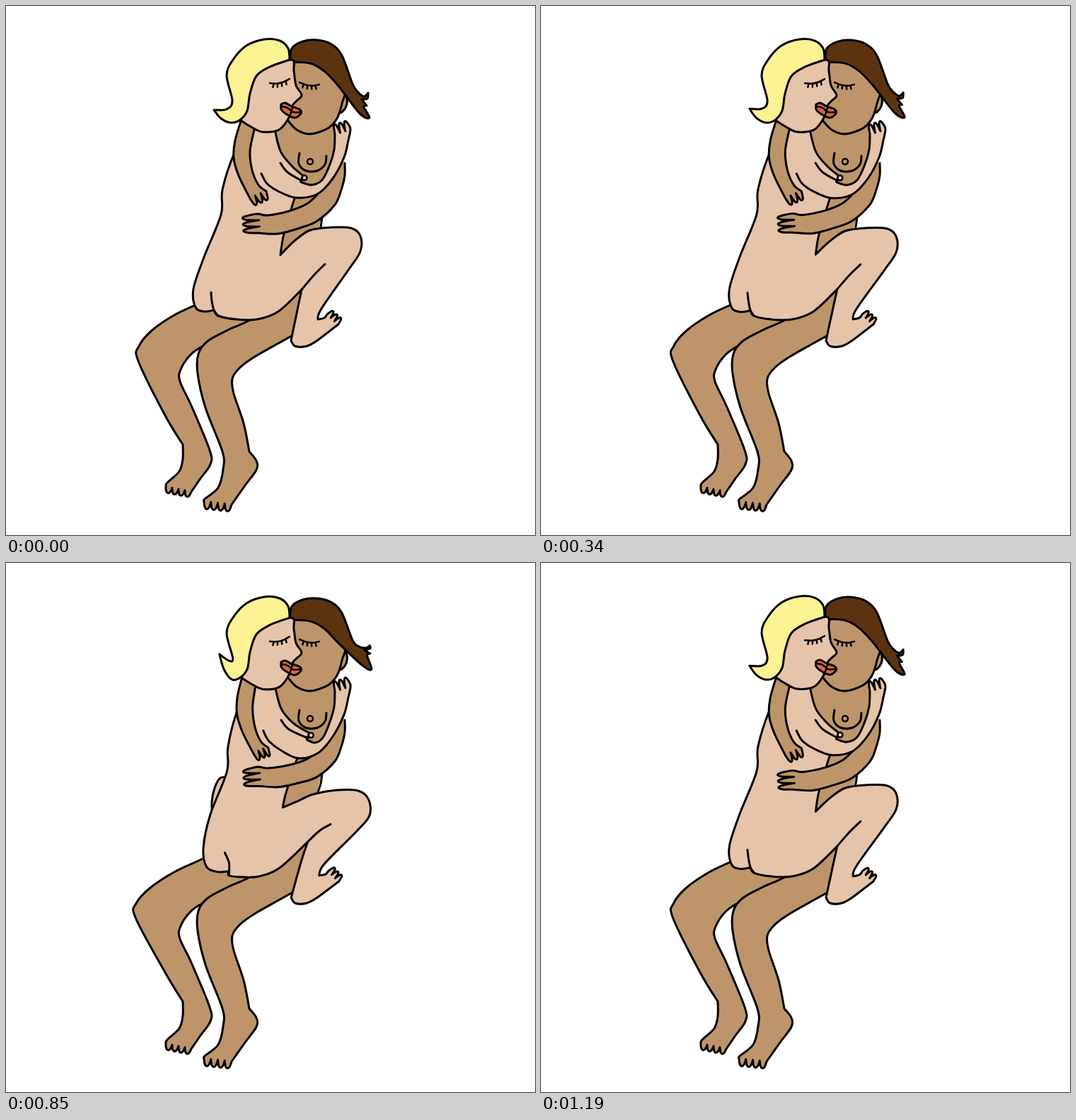
An HTML page that plays this animation: 748x748 px, repeating every 1360 ms.

```html
<!DOCTYPE html>
<html lang="en">
<head>
<meta charset="utf-8">
<title>Embrace</title>
<style>
  html, body { margin: 0; width: 100%; height: 100%; overflow: hidden; background: #fff; }
  svg { display: block; width: 100%; height: 100%; }
</style>
</head>
<body>
<svg id="stage" viewBox="0 0 748 748" fill="none" stroke="#000" stroke-width="3"
     stroke-linecap="round" stroke-linejoin="round"></svg>
<script>
const PALE = '#e6c4aa', TAN = '#be956a', BLOND = '#fbf293', DARK = '#5c3311', LIP = '#d9683f';
const STEP = 170;
const SWAY = [0, .05, .1, -.5, -1, 1, .6, .1]; // -1 leans left, 1 leans right

// Handles drag the points around them: place, reach, offset at left lean and right lean.
const handle = (x, y, reach, left, right) => ({ x, y, reach, left, right });
const HANDLES = [
  handle(268, 400, 70, [-9, 7], [13, 2]),    // hip
  handle(292, 422, 22, [0, 0], [14, 5]),     // cleft
  handle(306, 280, 45, [-10, 0], [8, 0]),    // back
  handle(330, 215, 45, [-10, 0], [4, 0]),    // shoulder
  handle(358, 275, 18, [-8, 0], [1, -4]),    // hand on the back
  handle(498, 345, 60, [-6, -4], [13, 10]),  // knee
  handle(425, 320, 40, [2, 2], [0, 7]),      // thigh
  handle(388, 352, 22, [-14, 7], [2, -8]),   // groin
  handle(402, 292, 30, [-6, 0], [4, 6]),     // belly
  handle(420, 244, 18, [-10, -4], [9, 0]),   // breast
  handle(425, 400, 35, [5, -4], [8, -8]),    // back of the knee
  handle(355, 105, 60, [-5, 1], [0, 2]),     // face
  handle(298, 147, 15, [-8, -4], [8, -20]),  // blond curl
  handle(512, 142, 22, [4, -4], [5, -13]),   // dark tips
  handle(440, 50, 40, [0, 2], [0, 2])        // crown
];
const ARM_LIFT = [handle(365, 305, 70, [2, 0], [1, -6])];
const SHIN_SLIP = [handle(187, 490, 40, [1, 0], [-4, 0])];

const stage = document.getElementById('stage');
const pairs = s => {
  const n = s.trim().split(' ').map(Number);
  return n.flatMap((v, i) => i % 2 ? [] : [[v, n[i + 1]]]);
};

// Outlines are x y pairs joined smoothly; a slash makes a corner.
const shape = s => s.split('/').map(pairs);

function lean(segs, sway, handles) {
  const side = sway < 0 ? 'left' : 'right', amount = Math.abs(sway);
  return segs.map(seg => seg.map(([x, y]) => {
    let dx = 0, dy = 0;
    for (const h of handles) {
      const w = amount * Math.exp(-((x - h.x) ** 2 + (y - h.y) ** 2) / h.reach ** 2);
      dx += w * h[side][0];
      dy += w * h[side][1];
    }
    return [x + dx, y + dy];
  }));
}

// A row of rounded fingers or toes from one point to another.
function digits(x0, y0, x1, y1, count, size) {
  const dx = x1 - x0, dy = y1 - y0, len = Math.hypot(dx, dy);
  const at = (k, h) => `${x0 + dx * k - dy / len * h * size} ${y0 + dy * k + dx / len * h * size}`;
  let out = at(0, 0);
  for (let i = 0; i < count; i++) {
    const p = (k, h) => at((i + k) / count, h);
    out += ` ${p(.2, .75)} ${p(.5, 1)} ${p(.8, .75)} ${p(1, 0)}`;
    if (i < count - 1) out += ' / ' + p(1, .01);
  }
  return out;
}

function curve(segs) {
  let last = null, d = '';
  for (const seg of segs) {
    const p = last ? [last, ...seg] : seg;
    if (!last) d = 'M' + p[0];
    for (let i = 0; i < p.length - 1; i++) {
      const a = p[i - 1] || p[i], b = p[i], c = p[i + 1], e = p[i + 2] || c;
      const h = [b[0] + (c[0] - a[0]) / 6, b[1] + (c[1] - a[1]) / 6,
                 c[0] - (e[0] - b[0]) / 6, c[1] - (e[1] - b[1]) / 6, ...c];
      d += 'C' + h.map(v => v.toFixed(1)).join(' ');
    }
    last = p[p.length - 1];
  }
  return d;
}

const body = shape('345 165 322 210 306 260 304 295 280 355 265 400 268 426 280 432 294 430 / ' +
  '300 438 325 443 355 443 385 432 418 401 / 413 425 403 473 / 409 481 425 481 440 473 470 450 / ' +
  digits(470, 450, 454, 436, 3, 9) + ' / 450 441 441 443 / 446 428 485 372 501 347 501 325 488 314 ' +
  '460 313 430 317 408 332 388 352 / 393 322 408 272 416 250 420 240 / 404 226 388 205 379 170');
const fold = shape('418 401 435 381 451 365');
const cleft = shape('290 405 291 417 294 430 300 438');
const paleArm = shape('361 237 369 251 385 262 410 271 440 266 462 244 478 214 484 190 ' +
  digits(487, 174, 465, 181, 3, 13) + ' / 464 203 458 224 447 246 432 253 417 249');
const bust = shape('388 222 398 235 418 247');
const nipple = shape('422 243');
const farKnee = shape('314 303 303 304 295 318 291 338 292 357');

const leftLeg = shape('300 408 272 421 238 437 206 459 188 481 187 502 225 579 250 620 / 250 640 245 658 228 674 ' +
  digits(226, 680, 262, 687, 4, 8) + ' / 275 668 289 648 288 628 262 565 246 531 247 514 262 492 285 477 312 461 345 445 370 425');
const rightLeg = shape('370 425 345 444 312 459 285 474 272 492 271 520 282 568 306 630 307 655 300 681 281 697 ' +
  digits(280, 701, 319, 705, 4, 10) + ' / 338 678 354 656 354 643 344 630 / 336 590 322 548 320 527 330 512 350 497 385 477 412 462 / 430 440 / 425 395');
const chest = shape('379 165 / 465 165 / 464 200 / 478 222 / 447 295 / 438 332 / 388 360 / 370 345 / 390 250');
const flank = shape('447 295 445 312 438 332');
const breast = shape('415 208 414 223 424 233 440 233 451 224 453 212');
const frontArm = shape('440 267 425 280 400 290 370 296 ' + digits(356, 294, 358, 321, 3, 22) +
  ' / 385 322 415 314 440 304 465 281 474 260 479 240 479 222');
const backArm = shape('333 160 324 190 322 215 329 240 345 272 ' + digits(345, 272, 368, 262, 3, 12) +
  ' / 357 253 348 232 345 205 351 175');

const ear = shape('476 120 482 130 481 142 475 150 470 151');
const tanFace = shape('400 80 440 82 478 112 475 138 468 159 455 173 430 181 411 175 397 160');
const tanHair = shape('402 76 404 60 420 50 440 48 460 54 475 70 490 110 498 122 506 128 512 123 / ' +
  '511 131 503 132 / 510 141 / 506 143 514 158 500 152 470 113 450 92 430 81 402 79');
const paleFace = shape('340 150 345 120 360 90 403 76 407 92 410 112 418 126 411 134 405 141 400 158 386 175 362 178 345 170 334 163');
const paleHair = shape('401 76 399 60 387 49 366 47 340 56 321 76 312 98 320 134 312 146 294 147 / ' +
  '304 159 318 165 331 161 341 148 345 124 354 99 373 86 401 76');
const lips = shape('389 139 395 137 404 142 415 146 417 152 408 158 395 152 389 146 389 139');
const lipLines = [shape('390 142 398 144 406 150 416 150'), shape('405 143 403 151 399 159')];

// A closed eye: bowed lid with short lashes.
function eye(x, y, width, drop) {
  const at = k => [x + width * k, y + drop * k + 12 * k * (1 - k)];
  const lines = [[[0, .33, .67, 1].map(at)]];
  for (let k = .2; k < .9; k += .2) {
    const [lx, ly] = at(k);
    lines.push([[[lx, ly], [lx + 4 * k - 2, ly + 5]]]);
  }
  return lines;
}
const paleEye = eye(373, 109, 28, -6), tanEye = eye(415, 108, 28, 3);

const draw = (segs, fill = 'none', extra = '') => `<path d="${curve(segs)}" fill="${fill}" ${extra}/>`;
const thin = list => list.map(s => draw(s, 'none', 'stroke-width="2.5"')).join('');
const ring = (x, y, r, fill) => `<circle cx="${x}" cy="${y}" r="${r}" fill="${fill}" stroke-width="2.5"/>`;

function scene(sway) {
  const bend = (segs, handles = HANDLES) => lean(segs, sway, handles);
  const soft = (segs, fill) => draw(bend(segs), fill);
  const [nx, ny] = bend(nipple)[0][0];
  const hidden = 14 * (1 - Math.max(0, sway));
  return draw(bend(leftLeg, SHIN_SLIP), TAN) + draw(rightLeg, TAN) +
    draw(farKnee, PALE, `transform="translate(${hidden} 0)"`) +
    draw(chest, TAN, 'stroke="none"') + draw(flank) + draw(breast) + ring(430, 220, 4, TAN) +
    soft(body, PALE) + soft(fold) + soft(cleft) +
    draw(bend(frontArm, ARM_LIFT), TAN) +
    soft(paleArm, PALE) + soft(bust) + ring(nx, ny, 3.5 * (1 + Math.min(0, sway)), PALE) +
    soft(backArm, TAN) +
    draw(ear, TAN) + draw(tanFace, TAN) + soft(tanHair, DARK) + thin(tanEye) +
    soft(paleFace, PALE) + soft(paleHair, BLOND) + thin(paleEye.map(s => bend(s))) +
    soft(lips, LIP) + thin(lipLines.map(s => bend(s)));
}

const scenes = SWAY.map(scene);
let shown = -1;

function tick(now) {
  const i = Math.floor(now / STEP) % scenes.length;
  if (i !== shown) stage.innerHTML = scenes[shown = i];
  requestAnimationFrame(tick);
}
tick(performance.now());
</script>
</body>
</html>
```
